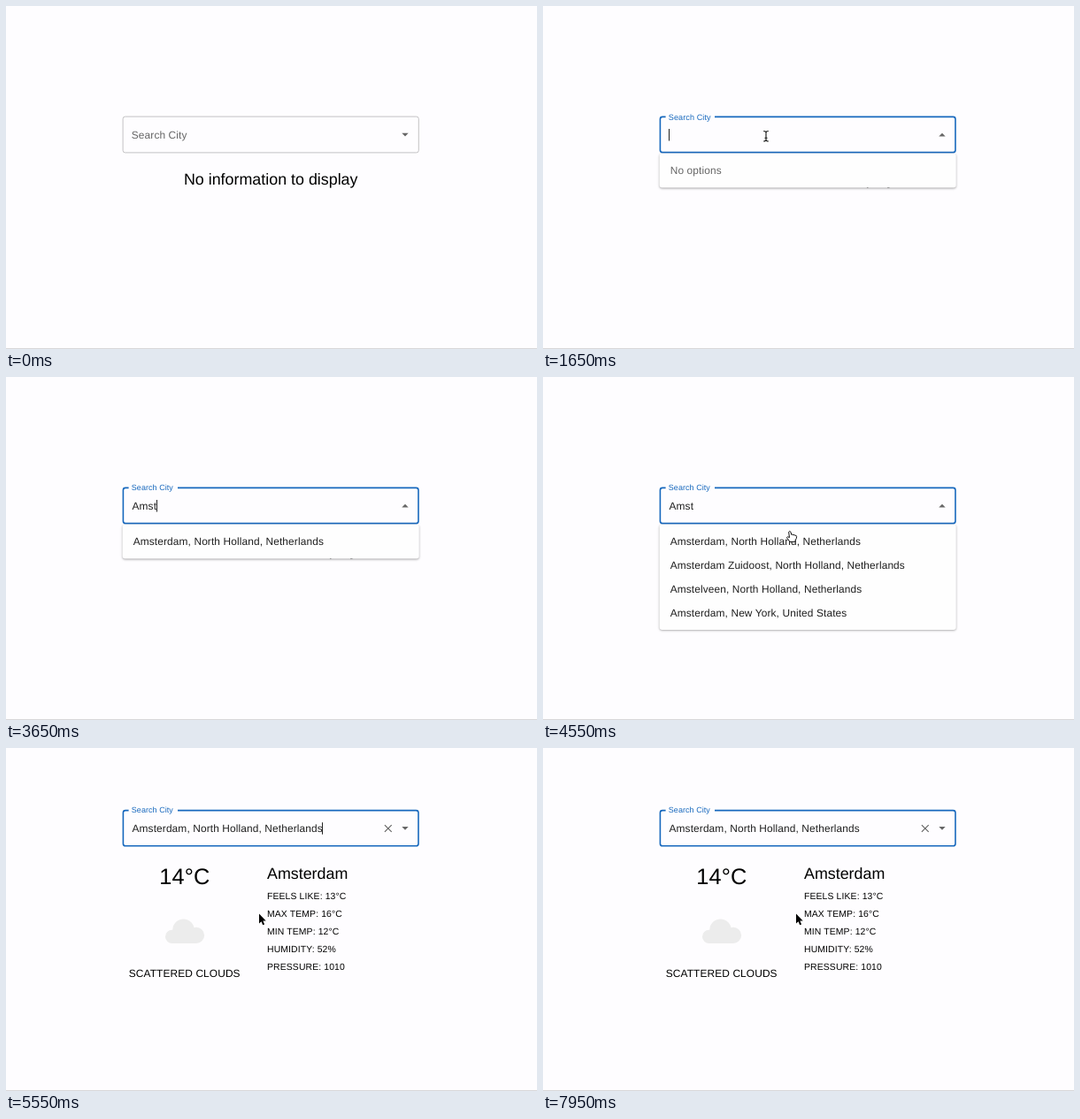
An HTML page with a canvas for the animation above (8 s loop, 600 by 388 pixels).

```html
<!DOCTYPE html>
<html lang="en">
<head>
<meta charset="utf-8">
<title>City weather search</title>
<style>
  html, body { margin: 0; width: 100%; height: 100%; overflow: hidden; background: #fefdff; }
  canvas { display: block; }
</style>
</head>
<body>
<canvas id="stage" width="600" height="388"></canvas>
<script>
const ctx = document.getElementById('stage').getContext('2d');
const LOOP = 8000, STEP = 50;
const BG = '#fefdff', BLUE = '#1768bd', GREY = '#666', INK = '#1f1f1f';
const BODY = 11.92, HEADING = 17.88, SMALL = 10.43;
const FIELD = { x: 131.6, y: 124.6, w: 335.2, h: 41.8 };
const CITY = 'Amsterdam, North Holland, Netherlands';
const OPTIONS = [
  CITY,
  'Amsterdam Zuidoost, North Holland, Netherlands',
  'Amstelveen, North Holland, Netherlands',
  'Amsterdam, New York, United States'
];
const DETAILS = ['FEELS LIKE: 13°C', 'MAX TEMP: 16°C', 'MIN TEMP: 12°C', 'HUMIDITY: 52%', 'PRESSURE: 1010'];

// Event times in ms
const FOCUS = 1550, OPEN = 1650, PICK = 5350, RESULT = 5500;
const KEYS = [[2650, 'A'], [3100, 'Am'], [3400, 'Ams'], [3650, 'Amst'], [PICK, CITY]];

const clamp = v => Math.min(1, Math.max(0, v));
const mix = (a, b, p) => a + (b - a) * p;
const smooth = p => p * p * (3 - 2 * p);
const easeOut = p => 1 - (1 - p) ** 3;

function setFont(size, spacing) {
  ctx.font = `${size}px "Liberation Sans", Arial, sans-serif`;
  ctx.letterSpacing = spacing + 'px';
  ctx.textRendering = 'geometricPrecision';
}

function text(str, x, y, size, color, { align = 'left', spacing = 0.112 } = {}) {
  setFont(size, spacing);
  ctx.textAlign = align;
  ctx.fillStyle = color;
  ctx.fillText(str, x, y);
}

function polygon(points) {
  ctx.beginPath();
  points.forEach(([x, y]) => ctx.lineTo(x, y));
  ctx.closePath();
}

function drawField(t, hovered) {
  const focused = t >= FOCUS;
  const open = t >= OPEN && t < PICK;
  const float = focused ? easeOut(clamp((t - FOCUS + 25) / 200)) : 0;
  const line = focused ? 1.6 : 1;
  const { x, y, w, h } = FIELD;

  ctx.beginPath();
  ctx.roundRect(x + line / 2, y + line / 2, w - line, h - line, 2.6);
  ctx.lineWidth = line;
  ctx.strokeStyle = focused ? BLUE : hovered ? '#2a2a2a' : '#c3c2c4';
  ctx.stroke();

  if (float > 0.3) {
    ctx.fillStyle = BG;
    ctx.fillRect(138.6, y - 1, 55.4 * clamp(float * 1.1), 4);
  }
  const scale = mix(1, 0.75, float);
  text('Search City', 141.8, mix(149.8, 128, float), BODY * scale,
    float > 0.4 ? BLUE : GREY, { spacing: 0.112 * scale });

  const tip = open ? -1.9 : 1.9;
  ctx.fillStyle = GREY;
  polygon([[447.3, 145.7 - tip], [454.7, 145.7 - tip], [451, 145.7 + tip]]);
  ctx.fill();

  if (focused) drawInput(t);
}

function drawInput(t) {
  const typed = KEYS.filter(([at]) => t >= at).pop();
  const [since, value] = typed || [FOCUS, ''];
  text(value, 142.5, 149.8, BODY, INK);
  if (Math.floor((t - since) / 500) % 2 === 0) {
    ctx.fillStyle = '#222';
    ctx.fillRect(Math.floor(142.5 + ctx.measureText(value).width), 139, 1, 13.5);
  }
  if (t >= PICK) {
    ctx.beginPath();
    for (const s of [-1, 1]) {
      ctx.moveTo(431.8 - 3.9, 145.8 - 3.9 * s);
      ctx.lineTo(431.8 + 3.9, 145.8 + 3.9 * s);
    }
    ctx.lineWidth = 1.2;
    ctx.strokeStyle = GREY;
    ctx.stroke();
  }
}

function drawPopup(t) {
  const rows = t < 3450 ? [] : OPTIONS.slice(0, t < 3700 ? 1 : 4);
  const height = 12 + 26.8 * Math.max(1, rows.length);
  ctx.save();
  ctx.shadowColor = 'rgba(0,0,0,.36)';
  ctx.shadowBlur = 2.4;
  ctx.shadowOffsetY = 0.9;
  ctx.fillStyle = '#fefefe';
  ctx.beginPath();
  ctx.roundRect(FIELD.x, 166.7, FIELD.w, height, 3);
  ctx.fill();
  ctx.restore();
  if (!rows.length) text('No options', 143.7, 190.2, BODY, GREY);
  rows.forEach((row, i) => text(row, 143.7, 190.2 + 26.8 * i, BODY, INK));
}

function drawCloud() {
  ctx.fillStyle = '#ececec';
  ctx.beginPath();
  for (const [x, y, r] of [[187.6, 213.4, 7.6], [200.5, 205.6, 12.2], [215, 211.9, 9.1]]) {
    ctx.moveTo(x + r, y);
    ctx.arc(x, y, r, 0, Math.PI * 2);
  }
  ctx.rect(187.6, 207, 27.4, 14);
  ctx.fill();
}

function drawResult(t) {
  text('14°C', 201.9, 154, 25.33, '#000', { align: 'center', spacing: 0.19 });
  if (t >= RESULT + STEP) drawCloud();
  text('SCATTERED CLOUDS', 201.7, 258.6, BODY, '#000', { align: 'center' });
  text('Amsterdam', 295, 148, HEADING, '#000', { spacing: 0 });
  DETAILS.forEach((row, i) => text(row, 295, 171.3 + 20 * i, SMALL, '#000'));
}

function pointerAt(t) {
  if (t < 150) return null;
  if (t < 200) return { kind: 'arrow', x: 172, y: 304 };
  if (t < 2650) {
    const p = smooth(clamp((t - 350) / 600));
    const x = mix(181, 252, p), y = mix(288, 147, p);
    const overText = y < 206 && y > 187 && x > 200;
    return { kind: y < 166 || overText ? 'beam' : 'arrow', x, y };
  }
  if (t < 4450) return null;
  const p = Math.sin(clamp((t - 4400) / 300) * Math.PI / 2);
  const x = mix(252, 286, p ** 0.6), y = mix(147, 188, p ** 1.2);
  const kind = t >= RESULT + STEP ? 'arrow' : t >= PICK || y < 166 ? 'beam' : 'hand';
  return { kind, x, y };
}

const POINTERS = {
  arrow() {
    polygon([[0, -0.5], [0, 10.6], [2.5, 8.3], [4.2, 12.3], [6.1, 11.5], [4.4, 7.6], [7.7, 7.4]]);
    ctx.lineWidth = 1.6;
    ctx.strokeStyle = '#fff';
    ctx.stroke();
    ctx.fillStyle = '#000';
    ctx.fill();
  },
  beam() {
    ctx.beginPath();
    ctx.moveTo(-2.8, -5.5);
    ctx.quadraticCurveTo(0, -5.5, 0, -3.8);
    ctx.quadraticCurveTo(0, -5.5, 2.8, -5.5);
    ctx.moveTo(0, -4);
    ctx.lineTo(0, 4.4);
    ctx.moveTo(-2.8, 6);
    ctx.quadraticCurveTo(0, 6, 0, 4.2);
    ctx.quadraticCurveTo(0, 6, 2.8, 6);
    ctx.moveTo(-1.5, 2.2);
    ctx.lineTo(1.5, 2.2);
    for (const [width, color] of [[2.4, '#fff'], [1.1, '#111']]) {
      ctx.lineWidth = width;
      ctx.strokeStyle = color;
      ctx.stroke();
    }
  },
  hand() {
    ctx.beginPath();
    ctx.moveTo(-1.2, 7);
    ctx.lineTo(-2, 1.3);
    ctx.quadraticCurveTo(-0.9, -0.4, 0.3, 1.2);
    ctx.lineTo(1.1, 4.3);
    ctx.quadraticCurveTo(2.4, 3.4, 3.3, 4.7);
    ctx.quadraticCurveTo(4.6, 4, 5.2, 5.2);
    ctx.quadraticCurveTo(6.8, 4.8, 7, 6.4);
    ctx.quadraticCurveTo(7, 9, 5.6, 10.4);
    ctx.lineTo(5.4, 12.3);
    ctx.lineTo(-0.8, 12.3);
    ctx.quadraticCurveTo(-2, 10.4, -4.2, 7.7);
    ctx.quadraticCurveTo(-3.6, 5.6, -1.2, 7.6);
    ctx.closePath();
    ctx.fillStyle = '#fff';
    ctx.fill();
    ctx.lineWidth = 1;
    ctx.strokeStyle = '#111';
    ctx.stroke();
  }
};

function draw(t) {
  const pointer = pointerAt(t);
  const done = t >= RESULT;
  ctx.fillStyle = BG;
  ctx.fillRect(0, 0, 600, 388);
  ctx.fillStyle = '#d8d7d9';
  ctx.fillRect(0, 387, 600, 1);

  if (done) drawResult(t);
  else text('No information to display', 299.2, 202.4, HEADING, '#000', { align: 'center', spacing: 0 });

  ctx.save();
  if (done) ctx.translate(0, -54.8);
  drawField(t, pointer && pointer.y < 166);
  ctx.restore();

  if (t >= OPEN && t < PICK) drawPopup(t);

  if (pointer) {
    ctx.save();
    ctx.translate(pointer.x, pointer.y);
    ctx.lineJoin = 'round';
    POINTERS[pointer.kind]();
    ctx.restore();
  }
}

function tick() {
  const t = performance.now() % LOOP;
  draw(Math.floor(t / STEP) * STEP);
  requestAnimationFrame(tick);
}
tick();
</script>
</body>
</html>
```
